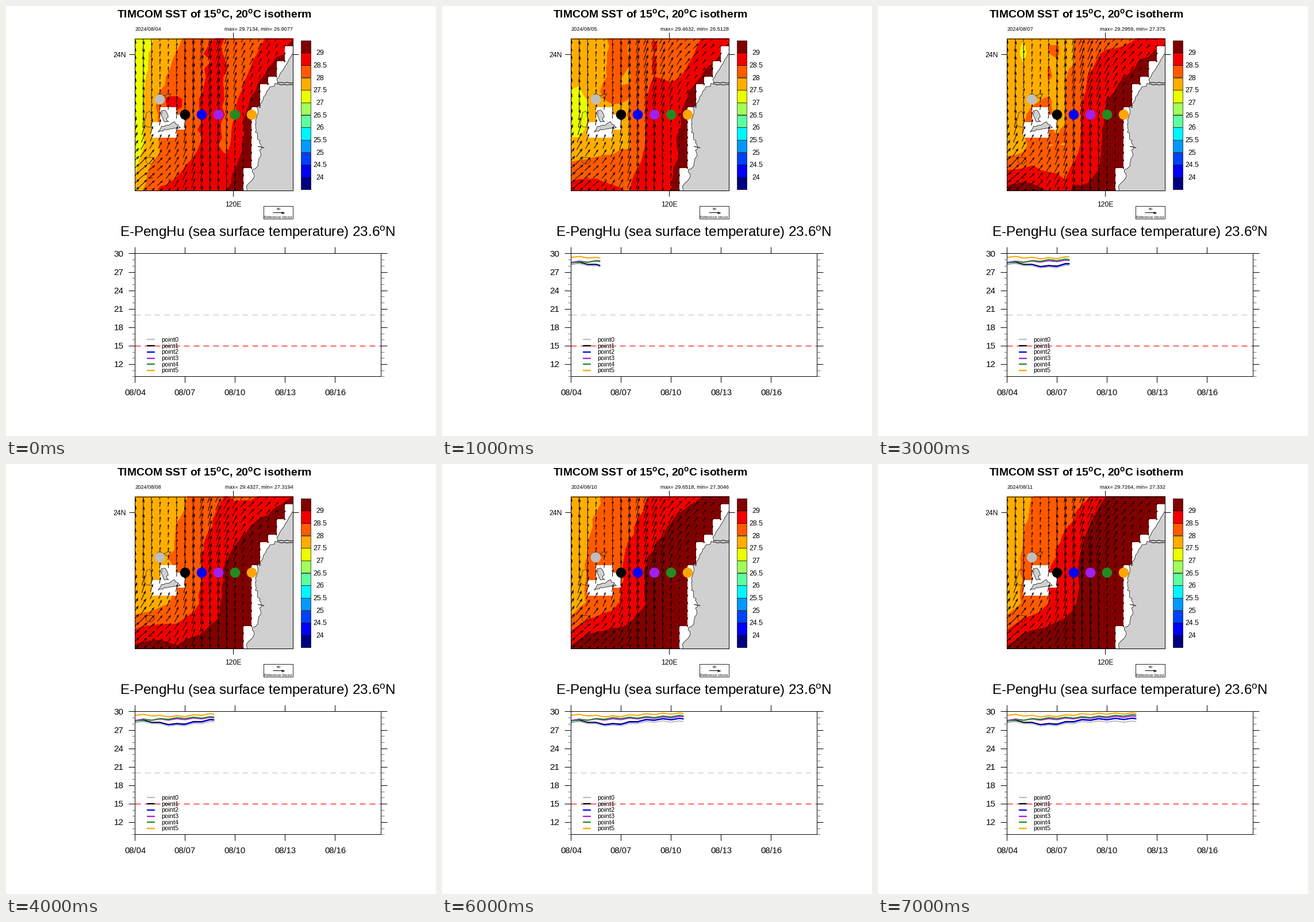
A matplotlib script that plays this animation: 748 by 748 pixels, repeating every 8 s.

```python
import numpy as np
import matplotlib.pyplot as plt
from matplotlib.animation import FuncAnimation
from matplotlib.collections import LineCollection, PolyCollection
from matplotlib.patches import Circle, Polygon, Rectangle
from matplotlib.path import Path

SIZE, PT = 748, 0.72
plt.rcParams["font.family"] = "Liberation Sans"

L, R, T, B = 224, 499, 56, 321          # map box
PL, PR, PT_TOP, PB = 224, 652, 430, 644  # plot box
COLS, ROWS = 19, 20                      # model cells on the map
DX, DY = (R - L) / COLS, (B - T) / ROWS

RAMP = ["#000080", "#0000f5", "#0040ff", "#0099ff", "#00f5ff", "#5cffa0",
        "#a0ff5c", "#ebff00", "#ffad00", "#ff5a00", "#f00000", "#800000"]
LEVELS = np.r_[0, np.arange(24, 29.1, 0.5), 99]
POINTS = ["#bebebe", "black", "blue", "#a020f0", "#228b22", "#ffa500"]

RANGES = [("29.7134", "26.9077"), ("29.4632", "26.5128"), ("29.2714", "27.0531"),
          ("29.2959", "27.375"), ("29.4327", "27.3194"), ("29.5758", "27.2728"),
          ("29.6518", "27.3046"), ("29.7264", "27.332")]

fig = plt.figure(figsize=(SIZE / 100, SIZE / 100), dpi=100, facecolor="white")
ax = fig.add_axes([0, 0, 1, 1])
ax.set(xlim=(-0.5, SIZE - 0.5), ylim=(SIZE - 0.5, -0.5))
ax.axis("off")
frame = Rectangle((L, T), R - L, B - T, fc="none", ec="black", lw=0.7, zorder=6)
ax.add_patch(frame)


# ---- drawing helpers ----

def text(x, y, s, px, ha="center", baseline=False, **kw):
    """Text centred on y by its cap height, or standing on y."""
    y = y if baseline else y + 0.345 * px
    return ax.text(x, y, s, fontsize=px * PT, ha=ha, va="baseline", **kw)


def line(x, y, color="black", px=1, **kw):
    kw.setdefault("solid_capstyle", "butt")
    return ax.plot(x, y, color=color, lw=px * PT, **kw)[0]


def box(x, y, w, h, fill="none", lw=0.6, **kw):
    ax.add_patch(Rectangle((x, y), w, h, fc=fill, ec="black", lw=lw, **kw))


def shape(pts, color, z, edge="none"):
    p = Polygon(pts, fc=color, ec=edge, lw=0.5, zorder=z)
    ax.add_patch(p)
    p.set_clip_path(frame)


def rough(pts, amp, seed):
    """The polyline through pts with small seeded bends."""
    pts = np.array(pts, float)
    s = np.r_[0, np.cumsum(np.hypot(*np.diff(pts, axis=0).T))]
    t = np.linspace(0, s[-1], int(s[-1] / 4))
    out = np.column_stack([np.interp(t, s, pts[:, k]) for k in (0, 1)])
    return out + np.random.default_rng(seed).normal(0, amp, out.shape)


def arrows(x, y, dx, dy):
    """Shafts and filled heads of arrows centred on x, y."""
    mid, d = np.column_stack([x, y]), np.column_stack([dx, dy])
    size = np.hypot(dx, dy)[:, None]
    unit = d / size
    side = np.column_stack([-unit[:, 1], unit[:, 0]])
    head = np.minimum(6, 2 + 0.2 * size)
    tail, tip = mid - d / 2, mid + d / 2
    neck = tip - unit * head
    shafts = LineCollection(np.stack([tail, neck + unit], 1), colors="black",
                            lw=PT, zorder=5)
    heads = PolyCollection(np.stack([tip, neck + side * head * 0.34,
                                     neck + unit * head * 0.25,
                                     neck - side * head * 0.34], 1),
                           fc="black", ec="black", lw=0.2, zorder=5)
    for c in (shafts, heads):
        ax.add_collection(c, autolim=False)
    return [shafts, heads]


# ---- model: land gaps, temperature, current ----

def corner(col, row):
    return L + DX * col, T + DY * row


def coast_steps():
    pts, row = [corner(COLS + 2, 1)], 1
    for col, height in zip(range(18, 12, -1), (2, 2, 1, 3, 8, 5)):
        pts += [corner(col, row), corner(col, row + height)]
        row += height
    return pts + [corner(COLS + 2, row)]


SEA_GAP = coast_steps()
ISLE_GAP = [corner(*c) for c in ((3, 9), (5, 9), (5, 10), (6, 10), (6, 12), (5, 12),
                                 (5, 13), (2, 13), (2, 11), (3, 11))]
GX, GY = np.meshgrid(L + DX * np.arange(COLS + 1), T + DY * np.arange(ROWS + 1))
V = (GY - T) / (B - T)                   # 0 at the top, 1 at the bottom
NORTH, SOUTH = np.clip(1 - 2 * V, 0, 1), np.clip(2 * V - 1, 0, 1)


def open_sea():
    pts = np.column_stack([GX.ravel(), GY.ravel()])
    keep = GX.ravel() < 490
    for gap in (SEA_GAP, ISLE_GAP):
        path = Path(gap)
        inside = [path.contains_points(pts + (i, j)) for i in (-2, 2) for j in (-2, 2)]
        keep &= ~np.all(inside, axis=0)
    return keep.reshape(GX.shape)


SEA = open_sea()


def key(day, *values):
    return np.interp(day, (0, 1, 3, 5, 7), values)


def bump(x, y, sx, sy):
    return np.exp(-((GX - x) / sx) ** 2 - ((GY - y) / sy) ** 2)


def pulse(day, when, width):
    return np.exp(-((day - when) / width) ** 2)


def temperature(day):
    # Isotherms 28, 28.5 and 29: place at mid height and at the top edge
    mid = (key(day, 262, 333, 332, 252, 247), key(day, 338, 354, 353, 325, 301),
           key(day, 405, 413, 392, 362, 347))
    top = (key(day, 311, 327, 347, 288, 266), key(day, 350, 364, 392, 353, 370),
           key(day, 510, 508, 505, 482, 392))
    west = key(day, 27.2, 27.7, 27.7, 27.7, 27.7)
    x28, x285, x29 = (m + (t - m) * NORTH ** 1.6 - b * SOUTH ** 2
                      for m, t, b in zip(mid, top, (0, 22, 18)))
    temp = np.where(GX < x28, west + (28 - west) * (GX - L) / (x28 - L),
                    np.where(GX < x285, 28 + 0.5 * (GX - x28) / (x285 - x28),
                             28.5 + 0.5 * (GX - x285) / (x29 - x285)))
    # Warm water entering from the south-west
    inflow = key(day, 0.5, 1, 1.5, 1.45, 1.4)
    temp += inflow * np.clip((V - 0.72) / 0.28, 0, 1) * np.clip((380 - GX) / 120, 0, 1)
    # Cold pool drifting north, cold tongue drawing back, warm spots near the islands
    temp -= 0.9 * np.exp(-day / 3) * (day > 0) * bump(228 + 8 * day, 240 - 55 * day, 20, 45)
    temp -= 0.4 * (day == 0) * bump(224, 242, 11, 9)
    reach = 0.78 * np.exp(-day)
    tongue = np.exp(-((GX - 380 - 45 * (1 - V) ** 2) / (17 + 16 * NORTH)) ** 2)
    temp -= 0.55 * tongue / (1 + np.exp((V - reach) / 0.03))
    temp += 0.4 * pulse(day, 1.8, 1.1) * bump(298, 90, 14, 75)
    temp += 0.7 * np.exp(-day) * bump(288, 168 - 18 * day, 17, 13)
    temp += 0.4 * pulse(day, 3, 0.6) * bump(272, 215, 24, 48)
    return temp + np.random.default_rng(day).normal(0, 0.025, temp.shape)


def current(day):
    jet = 11 * np.exp(-((GX - 350) / 48) ** 2) * (1 - 0.5 * SOUTH)
    edge = 8 * np.exp(-((GX - L) / 22) ** 2)
    wake = 6 * np.exp(-((GX - 282) / 22) ** 2) * np.clip(2 - 2.6 * V, 0, 1)
    shore = np.clip((440 + 90 * NORTH - GX) / 70, 0.25, 1)
    speed = (13 + jet + edge - wake) * shore
    turn = 1 - 0.4 * np.exp(-2 * day)
    angle = (5 + 44 * turn * np.clip((GX - 315) / 115, 0, 1) * np.clip(1 - 1.3 * V, 0, 1)
             + 44 * np.clip((355 - GX) / 90, 0, 1) * np.clip((V - 0.5) / 0.35, 0, 1))
    angle = np.radians(angle + np.random.default_rng(day).normal(0, 2, GX.shape))
    return speed * np.sin(angle), -speed * np.cos(angle)


# ---- time series ----

# Start, rise per day and depth of the shared dip for point0 to point5
TRENDS = [(28.5, -0.02, 0.75), (28.65, 0.02, 0.75), (28.45, 0.05, 0.7),
          (28.65, 0.07, 0.1), (28.5, 0.12, -0.1), (29.5, 0.025, 0.35)]
ORDER = (1, 2, 3, 4, 5, 0)


def series(i, t):
    start, rise, dip = TRENDS[i]
    return start + rise * t - dip * pulse(t, 2.4, 1.6) - 0.1 * np.cos(2 * np.pi * t)


def value_y(v):
    return PT_TOP + (30 - v) * (PB - PT_TOP) / 20


# ---- static parts ----

def draw_land():
    shape(SEA_GAP, "white", 2)
    shape(ISLE_GAP, "white", 2)
    north = rough([(499, 81), (493, 90), (484, 107), (473, 123), (472, 132)], 0.6, 1)
    south = rough([(472, 136), (459, 139), (448, 158), (437, 180), (434, 205),
                   (437, 230), (444, 245), (437, 280), (429, 284), (430, 300),
                   (420, 312), (417, 321)], 1.2, 2)
    shape([*north, *south, (R, B)], "#d0d0d0", 3, "black")
    shape(rough([(264, 219), (274, 206), (284, 208), (291, 200), (303, 211),
                 (284, 213), (264, 219)], 0.9, 3), "#d0d0d0", 3, "black")
    shape(rough([(270, 182), (276, 179), (283, 190), (278, 195), (284, 200),
                 (276, 202), (270, 194), (270, 182)], 0.7, 4), "#d0d0d0", 3, "black")
    reefs = ((248, 197, 6, 15), (250, 268, 8, 6), (267, 160, 5, 8), (280, 155, 4, 5),
             (283, 301, 3, 2), (250, 299, 3, 2), (444, 244, 3, 2))
    turn = np.linspace(0, 2 * np.pi, 14)
    for i, (x, y, w, h) in enumerate(reefs):
        ring = np.column_stack([x + w * np.cos(turn), y + h * np.sin(turn)])
        shape(rough(ring, 1.3, i), "none", 3, "#302010")
    for y in (133, 136):
        line(*rough([(473, y), (499, y)], 0.5, y).T, zorder=3)


def draw_map():
    draw_land()
    for a, b in ((L - 10, L), (R, R + 10)):
        line([a, b], [84, 84])
    for a, b in ((T - 10, T), (B, B + 10)):
        line([395, 395], [a, b])
    text(208, 84, "24N", 12.4, "right")
    text(395, 344, "120E", 12.3)
    for i, c in enumerate(POINTS):
        spot = (282 + 29 * i, 188.5) if i else (267, 162)
        ax.add_patch(Circle(spot, 8.8, fc=c, ec="none", zorder=8))
    text(361.5, 20.3, r"TIMCOM SST of 15$^{\mathregular{o}}$C, "
         r"20$^{\mathregular{o}}$C isotherm", 19.4, baseline=True, weight="bold")
    box(448, 348, 51, 22)
    text(473.5, 352, "80", 6.4)
    text(473.5, 366.5, "Reference Vector", 6.4)
    arrows([474], [359], [20.5], [0])


def draw_colorbar():
    h = 260 / len(RAMP)
    for i, c in enumerate(RAMP):
        box(513, 319 - (i + 1) * h, 16.5, h, c, 0.45)
        if i:
            text(545.5, 319 - i * h, f"{23.5 + i / 2:g}", 12.4)


def draw_plot():
    box(PL, PT_TOP, PR - PL, PB - PT_TOP, lw=0.7, zorder=4)
    for v in range(10, 31):
        y, major = value_y(v), v % 3 == 0
        n, w = (11, 1) if major else (5.5, 0.5)
        line([PL - n, PL], [y, y], px=w)
        line([PR, PR + n], [y, y], px=w)
        if major:
            text(204, y, str(v), 15.3, "right")
    for day in range(0, 13, 3):
        x = PL + 29 * day
        line([x, x], [PT_TOP - 11, PT_TOP])
        line([x, x], [PB, PB + 11])
        text(x, 671, f"08/{4 + day:02d}", 14.8)
    for v, c, w in ((20, "#bebebe", 1), (15, "red", 1.2)):
        line([PL, PR], [value_y(v)] * 2, c, w, dashes=(10 / w, 7 / w),
             dash_capstyle="butt", zorder=2)
    for i, c in enumerate(POINTS):
        y = 580 + 10.7 * i
        line([245.5, 258], [y, y], c, 2.3, solid_capstyle="round", zorder=3)
        text(270, y - 0.3, f"point{i}", 11, "left")
    text(437.5, 400.3, r"E-PengHu (sea surface temperature) 23.6$^{\mathregular{o}}$N",
         24.3, baseline=True)


draw_map()
draw_colorbar()
draw_plot()
date = text(224, 42.8, "", 9.2, "left", baseline=True)
extent = text(R, 42.3, "", 9.1, "right", baseline=True)
curves = [line([], [], POINTS[i], 2, zorder=3, solid_joinstyle="round") for i in ORDER]
moving = []


def update(day):
    while moving:
        moving.pop().remove()
    moving.append(ax.contourf(GX, GY, temperature(day), LEVELS, colors=RAMP, zorder=1))
    vectors = arrows(GX[SEA], GY[SEA], *(c[SEA] for c in current(day)))
    for v in vectors:
        v.set_clip_path(frame)
    moving.extend(vectors)

    date.set_text(f"2024/08/{4 + day:02d}")
    extent.set_text("max= {}, min= {}".format(*RANGES[day]))
    # Four samples a day; the curves appear from the second day on.
    t = np.arange(4 * (day + 1) if day else 0) / 4
    for c, i in zip(curves, ORDER):
        c.set_data(PL + 29 * t, value_y(series(i, t)))
    return moving


anim = FuncAnimation(fig, update, frames=8, interval=1000, repeat=True,
                     init_func=lambda: update(0), blit=False)
plt.show()
```
